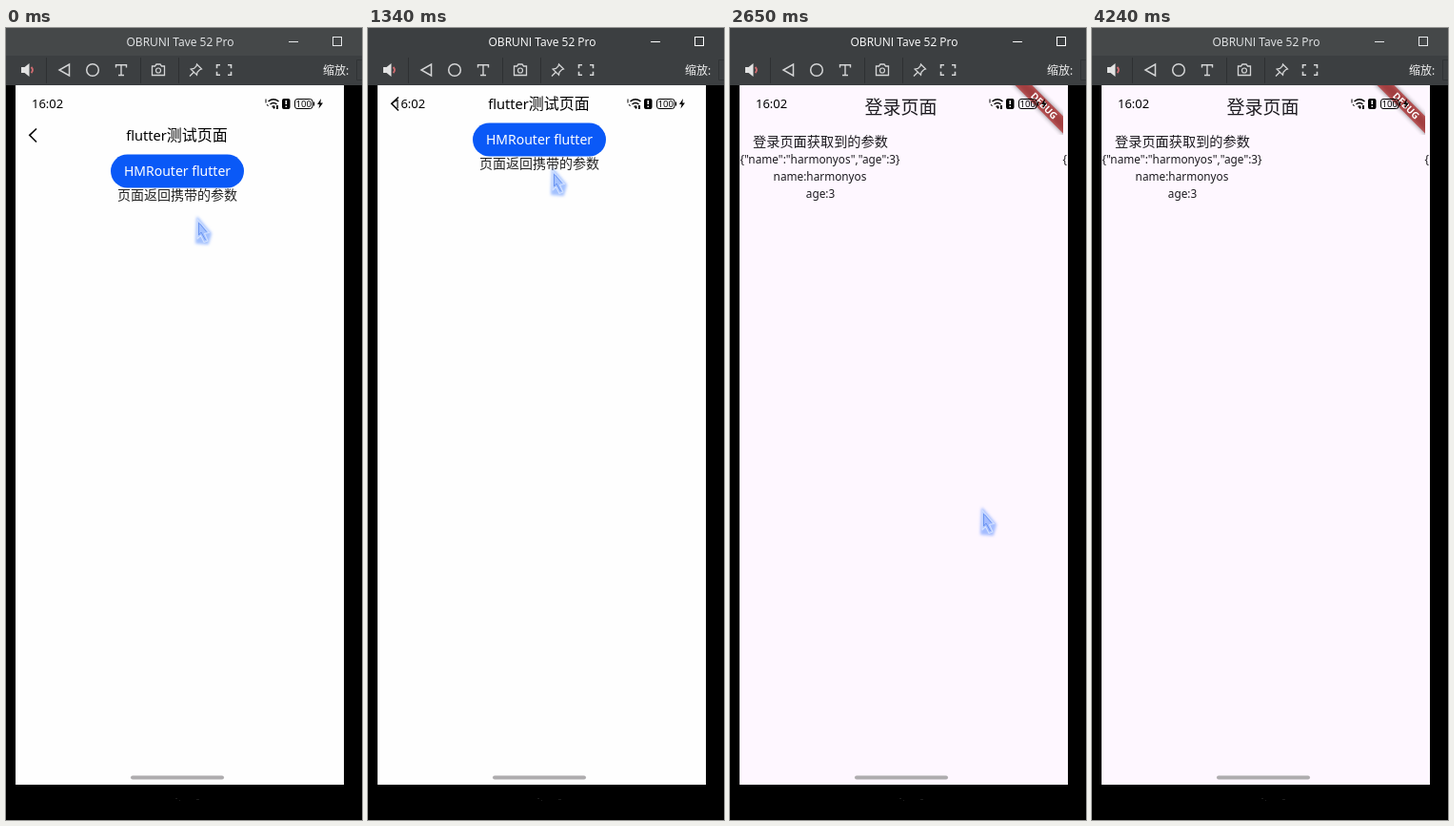
Animation of 374 by 830 pixels, one loop 4260 ms. Source, as an HTML page:

```html
<!DOCTYPE html>
<html lang="zh">
<head>
<meta charset="utf-8">
<style>
  html, body { margin: 0; width: 100%; height: 100%; overflow: hidden; background: #000; }
  svg { display: block; width: 374px; height: 830px; font-family: "Noto Sans", "Noto Sans CJK SC", "Noto Sans CJK", sans-serif; }
  .mid { text-anchor: middle; }
  .line { fill: none; stroke: #d4d5d6; stroke-width: 1.5; }
  .ink { fill: none; stroke: #000; }
  .glow { mix-blend-mode: multiply; }
</style>
</head>
<body>
<svg viewBox="0 0 374 830">
  <defs>
    <clipPath id="screen"><rect x="10" y="60" width="345" height="733"/></clipPath>
    <clipPath id="bannerArea"><rect x="290" y="60" width="60" height="52"/></clipPath>
    <filter id="soft" x="-50%" y="-50%" width="200%" height="200%"><feGaussianBlur stdDeviation="1.4"/></filter>
    <filter id="shadow" x="-20%" y="-100%" width="140%" height="300%"><feGaussianBlur stdDeviation="2.5"/></filter>
  </defs>

  <!-- window frame -->
  <rect width="374" height="60" fill="#3c3f41"/>
  <rect id="titleBar" width="374" height="29"/>
  <g id="caption">
    <text class="mid" x="183" y="19" font-size="12" font-weight="500" font-family="Open Sans, sans-serif">OBRUNI Tave 52 Pro</text>
    <path d="M297 14h10v1h-10z"/>
    <path d="M343 9h10v10h-10zM344 10v8h8v-8z" fill-rule="evenodd"/>
  </g>
  <path d="M42.500 31v27M141.500 31v27M181.500 31v27" stroke="#2e3032" fill="none"/>
  <path d="M374 33.500h-5.500v21h5.500" stroke="#303335" fill="none"/>
  <path d="M16 41h3.500l5-4v14l-5-4H16z" fill="#e2e2e2"/>
  <path d="M26.500 41q3 3 0 6" fill="none" stroke="#d26b70" stroke-width="1.800"/>
  <g class="line">
    <path d="M66.500 38v12L56 44z"/>
    <circle cx="91" cy="44" r="6.300"/>
    <path d="M115.500 41.500V38.700h11v2.800M121 38.700V49.500M118 49.500h6" stroke-width="1.400"/>
    <path d="M153.500 40h3l1.500-2h4l1.500 2h3v9.500h-13z" stroke-width="1.300"/>
    <circle cx="160" cy="44.500" r="2.500" stroke-width="1.200"/>
    <path d="M200.500 38l5 5-2 .7-2.500 2.500-.5 3-6.300-6 3.300-.7 2.500-2.500zM197 46.500l-4 4" stroke-width="1.300"/>
    <path d="M225 38.700h-3.500v3.500M233 38.700h3.500v3.500M225 49.300h-3.500v-3.500M233 49.300h3.500v-3.500" stroke-width="1.600"/>
  </g>
  <text x="333" y="48.500" font-size="12" font-weight="500" fill="#eee">缩放:</text>
  <path d="M178 807h2v1h-2zM182 809h1v1h-1zM200 808h3v1h-3z" fill="#1c1c1c"/>

  <g clip-path="url(#screen)">
    <rect id="paper" x="10" y="60" width="345" height="733"/>

    <g id="testPage">
      <path class="ink" d="M32 105.500L24.800 112.300L32 119.500" stroke-width="1.600"/>
      <text class="mid" x="179.500" y="118" font-size="16" font-weight="500"><tspan font-size="14.600">flutter</tspan>测试页面</text>
      <rect x="110" y="132.500" width="140" height="35" rx="17.500" fill="#0a59f7"/>
      <text class="mid" x="180" y="155" font-size="14" font-weight="500" fill="#fff">HMRouter flutter</text>
      <text class="mid" x="180" y="180" font-size="14" fill="#222">页面返回携带的参数</text>
    </g>

    <g id="loginPage" fill="#1d1b20">
      <text class="mid" x="179.500" y="90" font-size="19">登录页面</text>
      <text class="mid" x="95" y="123.500" font-size="14.200">登录页面获取到的参数</text>
      <g font-size="11.800">
        <text class="mid" x="94.500" y="142">{"name":"harmonyos","age":3}</text>
        <text x="349.500" y="142">{</text>
        <text class="mid" x="94.500" y="160">name:harmonyos</text>
        <text class="mid" x="95" y="177.500">age:3</text>
      </g>
      <g clip-path="url(#bannerArea)">
        <g transform="translate(330 81.500) rotate(45)">
          <rect x="-50" y="-6.300" width="100" height="12.600" fill="#000" opacity=".5" filter="url(#shadow)"/>
          <rect x="-50" y="-6.300" width="100" height="12.600" fill="#b71c1c" opacity=".63"/>
          <text class="mid" y="3.600" font-size="10" font-weight="900" fill="#fff">DEBUG</text>
        </g>
      </g>
    </g>

    <!-- status bar -->
    <text x="27" y="84" font-size="13" font-weight="500">16:02</text>
    <g class="ink" stroke-width="1.500">
      <path d="M275.500 77q5.500-4.500 11 0M277.500 80q3.500-2.800 7 0M279.500 82.500q1.500-1.200 3 0"/>
      <path d="M273 74.500v4M274 80l1.500 2" stroke-width="1"/>
      <rect x="303.500" y="74.500" width="18.500" height="10" rx="2.500" stroke-width="1"/>
      <path d="M323.500 77.500v4" stroke-width="1.200"/>
    </g>
    <path d="M280 83h3l-1.500 2zM284 81h2v4h-2z"/>
    <rect x="290" y="74" width="8.500" height="11" rx="2"/>
    <path d="M293.500 76h1.500v4h-1.500zM293.500 81.500h1.500v1.500h-1.500z" fill="#fff"/>
    <text class="mid" x="312.700" y="83" font-size="9.500" font-weight="500">100</text>
    <path d="M331 74l-4 6h2.500l-1 4.500 4.500-6h-2.700z"/>
    <rect x="131" y="783.500" width="98" height="4" rx="2" fill="#aeacae"/>
  </g>

  <!-- pointer: the glow darkens what lies below, the outline sits on top -->
  <path class="cursor glow" d="M5 2L19 18.500L16 29L4 28Z" fill="#94b7ff" stroke="#94b7ff" stroke-width="2" stroke-linejoin="round" opacity=".85" filter="url(#soft)"/>
  <g class="cursor" fill="none" stroke-linejoin="round">
    <path d="M5 3.500L17.500 17.500L12.500 18.500L16 26L12 27.500L8.500 20.500L5 24Z" stroke="#d3e2ff" stroke-width="1.100"/>
    <path d="M6.500 7v13l2.500-3 4.500 8M7.500 8l7 8.500" stroke="#6590f0" stroke-width=".9"/>
  </g>
</svg>
<script>
const LOOP = 4260;
const START = [196, 197];
// Each move reaches its goal in equal steps: first step, last step, step count, goal.
const MOVES = [
  [400, 760, 7, 191, 147],
  [1180, 1340, 3, 189, 146],
  [1430, 1490, 2, 190, 148],
  [2320, 2650, 5, 260, 502],
  [2890, 3190, 6, 321, 753],
  [3280, 3370, 2, 344, 808],
  [3430, 3620, 3, 344, 834]
];
const el = id => document.getElementById(id);
const show = (id, on) => el(id).setAttribute('display', on ? 'inline' : 'none');
const cursorParts = document.querySelectorAll('.cursor');

function cursorAt(t) {
  let [x, y] = START;
  for (const [from, to, steps, goalX, goalY] of MOVES) {
    if (t < from) break;
    const gap = (to - from) / (steps - 1);
    const done = Math.min(1, (Math.floor((t - from) / gap + 1e-6) + 1) / steps);
    x += (goalX - x) * done;
    y += (goalY - y) * done;
  }
  return [x, y];
}

function draw(t) {
  const login = t >= 2230;
  const focused = t < 1030 || t >= 4240;
  el('titleBar').setAttribute('fill', focused ? '#454849' : '#3c3f41');
  el('caption').setAttribute('fill', focused ? '#e6e8ea' : '#fff');
  el('paper').setAttribute('fill', login ? '#fef7ff' : '#fefefe');
  show('testPage', !login);
  show('loginPage', login);
  el('testPage').setAttribute('transform', `translate(0 ${t >= 1340 ? -33 : 0})`);
  const place = `translate(${cursorAt(t)})`;
  cursorParts.forEach(part => part.setAttribute('transform', place));
}

const begin = performance.now();
function tick() {
  draw((performance.now() - begin) % LOOP);
  requestAnimationFrame(tick);
}
tick();
</script>
</body>
</html>
```
